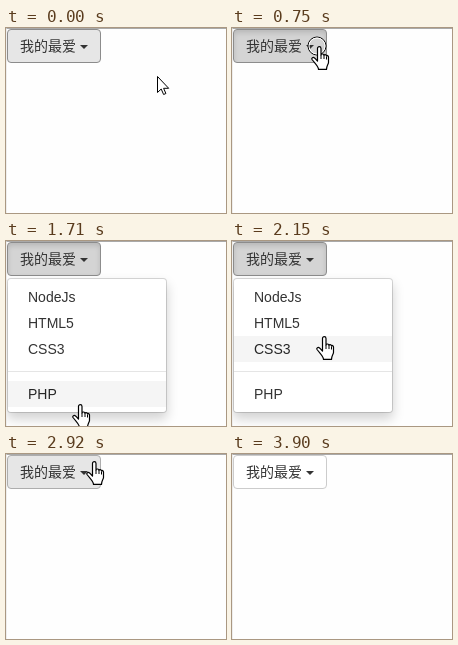
Write an HTML page that moves like this. It is 220 px wide and 185 px high and loops after 4040 ms.

```html
<!DOCTYPE html>
<html lang="zh">
<head>
<meta charset="utf-8">
<style>
  * { box-sizing: border-box; }
  html, body { margin: 0; width: 100%; height: 100%; overflow: hidden; }
  body {
    position: relative;
    background: #fefefe;
    border-top: 1px solid #a9a9a9;
    border-left: 1px solid #eee;
    font: 14px/20px "Liberation Sans", "Noto Sans CJK SC", "Noto Sans CJK", sans-serif;
    color: #333;
  }
  #button {
    position: absolute; left: 0; top: 0; width: 94px; height: 34px;
    padding: 6px 12px; white-space: nowrap;
    background: #fff; border: 1px solid #ccc; border-radius: 4px;
  }
  #button.focus { background: #e6e6e6; border-color: #8c8c8c; }
  #button.hover { background: #e6e6e6; border-color: #adadad; }
  #button.active {
    background: #d4d4d4; border-color: #8c8c8c;
    box-shadow: inset 0 3px 5px rgba(0, 0, 0, .125);
  }
  .caret {
    display: inline-block; width: 0; height: 0; vertical-align: middle;
    border: 4px solid transparent; border-top-color: #333; border-bottom: 0;
  }
  #menu {
    position: absolute; left: 0; top: 36px; width: 160px; height: 135px;
    margin: 0; padding: 5px 0; list-style: none;
    background: #fff; background-clip: padding-box;
    border: 1px solid rgba(0, 0, 0, .15); border-radius: 4px;
    box-shadow: 0 6px 12px rgba(0, 0, 0, .175);
  }
  .item { height: 26px; padding: 3px 20px; }
  .item.hover { background: #f5f5f5; color: #262626; }
  .divider { height: 1px; margin: 9px 0; background: #e5e5e5; }
  svg { position: absolute; left: -1px; top: -1px; width: 220px; height: 185px; }
  svg path { fill: #fff; stroke: #000; stroke-linejoin: round; }
  svg circle { fill: none; }
</style>
</head>
<body>
<div id="button">我的最爱 <span class="caret"></span></div>
<ul id="menu">
  <li class="item">NodeJs</li>
  <li class="item">HTML5</li>
  <li class="item">CSS3</li>
  <li class="divider"></li>
  <li class="item">PHP</li>
</ul>
<svg viewBox="0 0 220 185">
  <g id="pointer">
    <g id="ring">
      <circle r="9" stroke="#000"/>
      <circle r="8" stroke="#fff"/>
    </g>
    <path id="arrow" d="M.5 .5V16.5L4.2 13 6.6 18.5 8.9 17.5 6.6 12.3H11.7Z"/>
    <g id="hand" transform="translate(-6 0)">
      <path stroke-width="1.2" d="M6.5 15V2.5C6.5 0 10 0 10 2.5V9C10 7.6 13 7.6 13 9.5C13 8 15.5 8.3 15.5 10C15.5 9 17.5 9.3 17.5 11V16.5C17.5 18 15.5 20 15.5 23.4H7.5C7.5 20.5 4 17.5 1 13.5C.2 12 2 10.6 3.8 12.2Z"/>
      <path d="M10 9v4M13 9.5v3.5M15.5 10.5v3"/>
    </g>
  </g>
</svg>
<script>
const LOOP = 4040, STEP = 30;
const $ = id => document.getElementById(id);
const items = [...document.querySelectorAll('.item')];
const itemTops = [43, 69, 95, 140];

// Pointer hotspot: [ms, x, y]
const path = [
  [0, 151, 48], [120, 151, 48], [420, 111, 40], [660, 85, 18],
  [1240, 85, 18], [1270, 85, 38], [1390, 91, 76], [1710, 72, 163],
  [1860, 72, 163], [2130, 90, 95], [2410, 101, 28], [2530, 86, 7],
  [3200, 86, 7], [3230, 104, 32], [3300, 143, 86], [3530, 170, 186], [LOOP, 170, 186]
];

function pointerAt(t) {
  const i = path.findIndex(key => key[0] > t);
  const [t0, x0, y0] = path[i - 1], [t1, x1, y1] = path[i];
  const k = Math.floor((t - t0) / STEP) * STEP / (t1 - t0);
  return [Math.round(x0 + (x1 - x0) * k), Math.round(y0 + (y1 - y0) * k)];
}

const between = (t, from, to) => t >= from && t < to;
const show = (id, visible) => $(id).style.display = visible ? '' : 'none';

function draw(t) {
  const [x, y] = pointerAt(t);
  const open = between(t, 960, 2920);
  const pressed = between(t, 750, 960) || between(t, 2770, 2920);
  const overButton = x < 95 && y < 35;
  const overItem = open && x < 161 && (between(y, 37, 121) || between(y, 140, 166));

  $('button').classList.toggle('focus', t < 3900);
  $('button').classList.toggle('hover', overButton);
  $('button').classList.toggle('active', open || pressed);
  items.forEach((item, i) =>
    item.classList.toggle('hover', open && between(y, itemTops[i], itemTops[i] + 26)));

  show('menu', open);
  show('ring', pressed);
  show('hand', overButton || overItem);
  show('arrow', !overButton && !overItem);
  $('pointer').setAttribute('transform', `translate(${x} ${y})`);
}

function frame() {
  draw(performance.now() % LOOP);
  requestAnimationFrame(frame);
}
frame();
</script>
</body>
</html>
```
